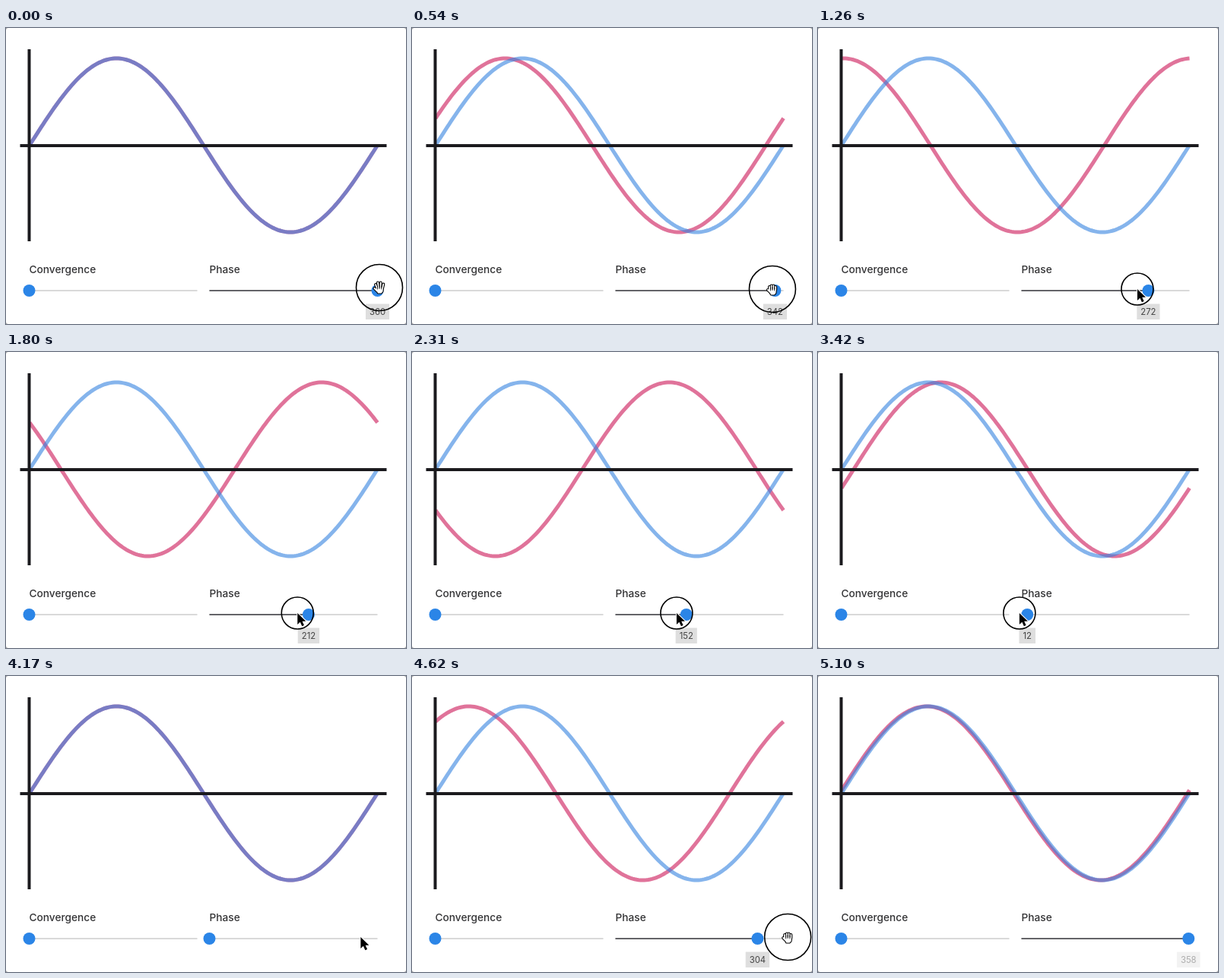
These frames come from a looping animation (526 px wide and 390 px high, 5130 ms). An HTML page with a canvas:

```html
<!DOCTYPE html>
<html lang="en">
<head>
<meta charset="utf-8">
<title>Phase slider</title>
<style>
html, body { margin: 0; width: 100%; height: 100%; overflow: hidden; background: #999; }
canvas { display: block; background: #fff; border-radius: 3px; }
</style>
</head>
<body>
<canvas id="stage" width="526" height="390"></canvas>
<script>
const ctx = document.getElementById('stage').getContext('2d');
const LOOP = 5130, CLICK = 4350;
const LEFT = 31, RIGHT = 488.5, MID = 154.5, AMP = 114.5;
const TRACK_Y = 346, TRACK_W = 221, PHASE_X = 267.5;

// [time, value] keys, joined by a smooth curve
const dragKeys = [[0, 360], [540, 342], [1260, 272], [2310, 152], [2910, 66], [3400, 14], [3800, 1], [3950, 0]];
const mouseKeys = [[0, 491], [540, 474], [1260, 420], [2310, 348], [2910, 298], [3450, 264], [3750, 276],
  [4170, 466], [4300, 480], [CLICK, 486], [4620, 494], [4850, 560]];

const clamp = v => Math.min(1, Math.max(0, v));
const ramp = (t, from, to) => clamp((t - from) / (to - from));

function spline(keys, t) {
  const last = keys.length - 1;
  if (t >= keys[last][0]) return keys[last][1];
  const i = keys.findIndex(k => k[0] > t) - 1;
  const slope = j => j <= 0 || j >= last ? 0
    : (keys[j + 1][1] - keys[j - 1][1]) / (keys[j + 1][0] - keys[j - 1][0]);
  const [t0, a] = keys[i], [t1, b] = keys[i + 1];
  const d = t1 - t0, u = (t - t0) / d, v = 1 - u;
  return v * v * (1 + 2 * u) * a + u * u * (3 - 2 * u) * b
    + d * u * v * (v * slope(i) - u * slope(i + 1));
}

function phaseAt(t) {
  if (t < CLICK) return Math.max(0, spline(dragKeys, t));
  return 360 * (1 - Math.exp((CLICK - t) / 145));
}

function line(x1, y1, x2, y2, width, color) {
  ctx.lineWidth = width;
  ctx.strokeStyle = color;
  ctx.beginPath();
  ctx.moveTo(x1, y1);
  ctx.lineTo(x2, y2);
  ctx.stroke();
}

function dot(x, y, r) {
  ctx.beginPath();
  ctx.arc(x, y, r, 0, 2 * Math.PI);
}

function wave(phase, color) {
  ctx.beginPath();
  for (let deg = 0; deg <= 360; deg += 2) {
    const y = MID - AMP * Math.sin((deg - phase) * Math.PI / 180);
    ctx.lineTo(LEFT + (RIGHT - LEFT) * deg / 360, y);
  }
  ctx.lineWidth = 5;
  ctx.strokeStyle = color;
  ctx.stroke();
}

function slider(label, x, share) {
  const thumb = x + TRACK_W * share;
  ctx.font = '500 13.7px Inter, Roboto, sans-serif';
  ctx.textAlign = 'left';
  ctx.fillStyle = '#333335';
  ctx.fillText(label, x, 323);
  line(x, TRACK_Y, x + TRACK_W, TRACK_Y, 2, '#d9d9d9');
  line(x, TRACK_Y, thumb, TRACK_Y, 2, '#646468');
  dot(thumb, TRACK_Y, 8);
  ctx.fillStyle = '#2b85e7';
  ctx.fill();
  return thumb;
}

function tooltip(x, value, alpha) {
  ctx.globalAlpha = alpha;
  ctx.font = '400 11.3px Inter, Roboto, sans-serif';
  ctx.textAlign = 'center';
  const w = ctx.measureText(value).width + 10;
  ctx.fillStyle = '#dedede';
  ctx.fillRect(x - w / 2, 363.5, w, 20.5);
  ctx.fillStyle = '#444';
  ctx.fillText(value, x, 378);
  ctx.globalAlpha = 1;
}

function arrow(x, y) {
  const p = new Path2D('M0 0V15L3.5 11.8 6 17.3 8.7 16.1 6.3 10.8H11Z');
  ctx.save();
  ctx.translate(x, y);
  ctx.lineJoin = 'round';
  ctx.lineWidth = 2;
  ctx.strokeStyle = '#fff';
  ctx.stroke(p);
  ctx.fillStyle = '#000';
  ctx.fill(p);
  ctx.restore();
}

function hand(x, y, closed) {
  const fingers = closed
    ? 'M-4 1V-3M-1.3 0V-4.5M1.4 0V-4.5M4.2 1V-3M-6 1L-3 4'
    : 'M-3 1L-5 -4M-1 0L-2 -6.5M1.5 0L1.7 -6.5M4 1L5.3 -4.5M-6.5 1L-3 4.5';
  const palm = 'M-3.5 1.5H4L3.5 5 2 6.5H-1.5Z';
  ctx.save();
  ctx.translate(x, y);
  ctx.lineCap = ctx.lineJoin = 'round';
  const inner = new Path2D(fingers + palm);
  for (const [width, color] of [[4, '#000'], [1.8, '#fff']]) {
    ctx.lineWidth = width;
    ctx.strokeStyle = ctx.fillStyle = color;
    ctx.stroke(inner);
    ctx.fill(new Path2D(palm));
  }
  ctx.lineWidth = 0.8;
  ctx.strokeStyle = '#000';
  ctx.stroke(new Path2D('M-2.5 2V-2M0 1.5V-3M2.8 2V-2'));
  ctx.restore();
}

function cursor(t, x) {
  if (t > 4850) return;
  const y = 344 - 2 * (1 - ramp(t, 0, 400));
  const pressed = t < 3620 || t >= CLICK;
  const overThumb = t < 780 || t > 4540;
  if (overThumb) hand(x, y, t > 120);
  else arrow(x, y);
  if (!pressed) return;
  const grow = t < CLICK ? 1 - ramp(t, 720, 900) : ramp(t, 4480, 4600);
  dot(x, y, 21 + 9.5 * grow);
  ctx.lineWidth = 1.6;
  ctx.strokeStyle = '#000';
  ctx.stroke();
}

function draw(t) {
  const phase = phaseAt(t);
  ctx.clearRect(0, 0, 526, 390);

  wave(phase, 'rgba(203, 22, 88, .6)');
  wave(0, 'rgba(53, 130, 223, .6)');
  line(30.5, 28, 30.5, 281, 4, '#1b1a1e');
  line(18.5, 155, 500.5, 155, 4, '#1b1a1e');

  slider('Convergence', 30.5, 0);
  const thumb = slider('Phase', PHASE_X, phase / 360);

  const shown = t < CLICK ? 1 - ramp(t, 3560, 3800)
    : ramp(t, CLICK, 4500) * (1 - ramp(t, 4980, 5180));
  tooltip(thumb, 2 * Math.round(phase / 2), shown);
  cursor(t, spline(mouseKeys, t));
}

const start = performance.now();
function tick() {
  draw((performance.now() - start) % LOOP);
  requestAnimationFrame(tick);
}
tick();
</script>
</body>
</html>
```
